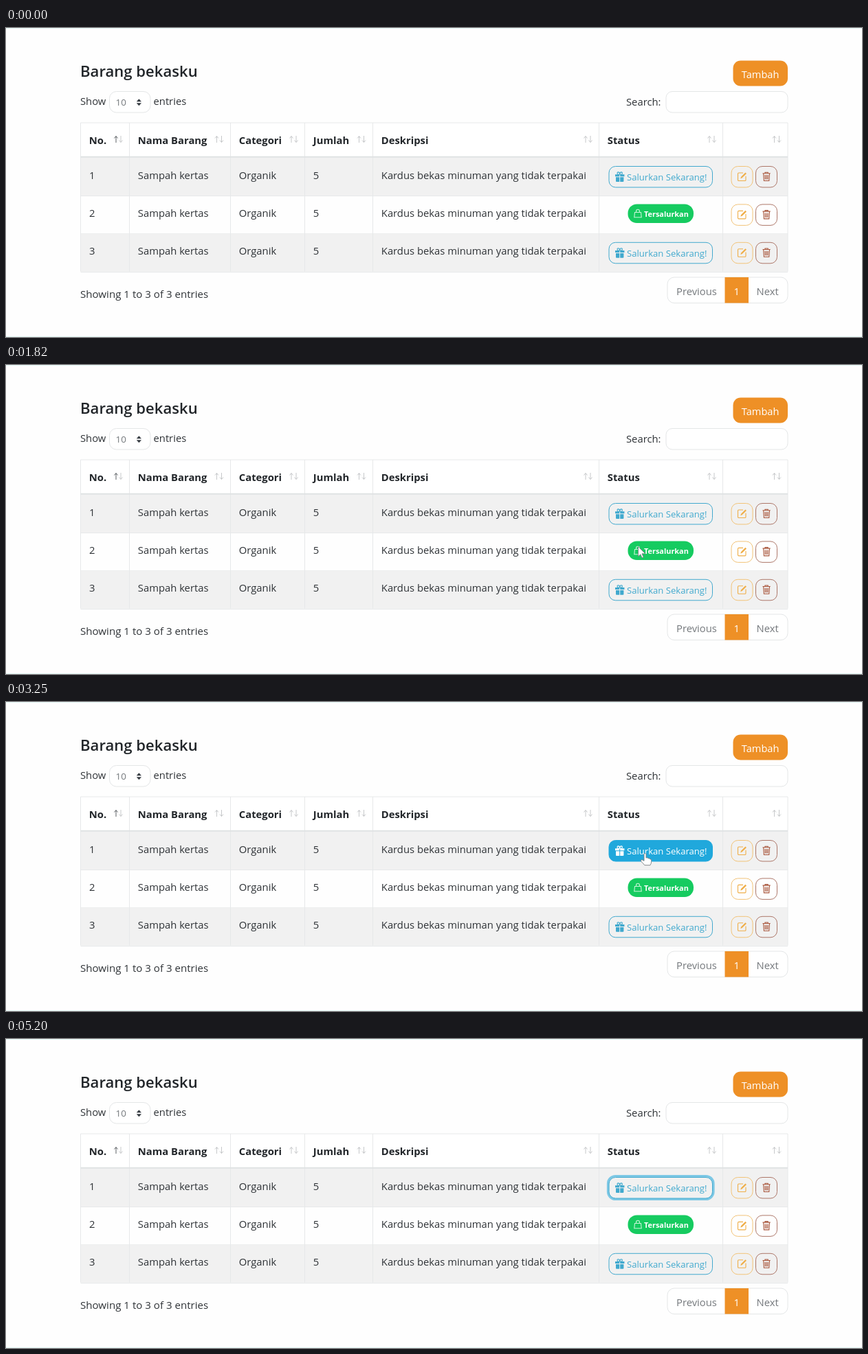
Animation, 1245 px wide and 450 px high, one loop 5.33 s. Source, as an HTML page:

```html
<!DOCTYPE html>
<html lang="id">
<head>
<meta charset="utf-8">
<title>Barang bekasku</title>
<style>
  html, body { margin: 0; width: 100%; height: 100%; overflow: hidden; background: #fefefe; }
  svg { display: block; width: 1245px; height: 450px; font: 14.8px "Open Sans", "Noto Sans", sans-serif; fill: #2f3337; }
  .line { fill: none; stroke: #e6e8e9; }
  .box { fill: #fff; stroke: #e4e6e7; }
  .bold { font-weight: 700; fill: #212529; }
  .muted { fill: #74787c; }
  .orange { fill: #ee9026; }
  .white { fill: #fff; }
  .sort { fill: none; stroke: #c6c8ca; }
  .icon { fill: none; stroke: currentColor; stroke-width: 1.1; }
</style>
</head>
<body>
<svg id="stage" viewBox="0 0 1245 450"></svg>
<script>
const STEP = 130, LOOP = 5330;
const BLUE = [32, 168, 220], OUTLINE = [65, 169, 206], WHITE = [255, 255, 255];
const columns = [108.5, 179.5, 326.5, 434.5, 533.5, 862.5, 1042.5, 1137];
const headers = ['No.', 'Nama Barang', 'Categori', 'Jumlah', 'Deskripsi', 'Status'];
const cells = ['Sampah kertas', 'Organik', '5', 'Kardus bekas minuman yang tidak terpakai'];
const sortX = [160, 306.5, 415, 513.5, 843, 1023, 1117.5];

const text = (x, y, label, attrs = '') => `<text x="${x}" y="${y}" ${attrs}>${label}</text>`;
const rect = (x, y, w, h, r, attrs) =>
  `<rect x="${x}" y="${y}" width="${w}" height="${h}" rx="${r}" ${attrs}/>`;
const path = (d, attrs) => `<path d="${d}" ${attrs}/>`;

const sortArrows = (x, i) =>
  path(`M${x} 167V157.5m-2.5 3 2.5-3 2.5 3`, `class="sort" ${i ? '' : 'style="stroke:#5c6064"'}`) +
  path(`M${x + 7} 157V166.5m-2.5-3 2.5 3 2.5-3`, 'class="sort"');

const giftIcon = `<g fill="currentColor">
  <path d="M886 213.2h6.2v3h-6.2zM893.2 213.2h6.2v3h-6.2zM887 217.2h5.2v6.8h-4.2q-1 0-1-1zM893.2 217.2h5.2v5.8q0 1-1 1h-4.2z"/>
  <path class="icon" d="M892.7 213.2h-3.2q-1.2-3.3 1-3.3 2.2 0 2.2 3.3 0-3.3 2.2-3.3 2.2 0 1 3.3z"/></g>`;

const sendButton = (id, dy) => `<g id="${id}" transform="translate(0 ${dy})">
  ${rect(875.5, 199.5, 153.5, 34, 11, 'class="ring" fill="none" stroke="#20a8dc" stroke-opacity=".55" stroke-width="3.2" opacity="0"')}
  ${rect(877, 201.5, 150.5, 30.5, 9.5, 'class="face" fill="#20a8dc" fill-opacity="0" stroke="#41a9ce"')}
  ${giftIcon}${text(903, 222, 'Salurkan Sekarang!', 'font-size="13.1" fill="currentColor"')}</g>`;

const badge = rect(904.5, 256.5, 95.5, 27.5, 13, 'fill="#16cb60"') +
  path('M914.5 268.5h9l.7 7.2h-10.4zM916.6 268.5v-2q0-2.3 2.4-2.3t2.4 2.3v2', 'class="icon" style="color:#c8f5d8"') +
  text(928, 274.7, 'Tersalurkan', 'class="white" font-size="10.9" font-weight="700"');

const rowTools = dy => `<g transform="translate(0 ${dy})">
  <g color="#efae48">${rect(1055, 201.5, 31, 30.5, 9.5, 'fill="none" stroke="#f2c377"')}
  ${path('M1072 211h-6.2q-1.3 0-1.3 1.3v8.9q0 1.3 1.3 1.3h8.9q1.3 0 1.3-1.3v-5.5', 'class="icon"')}
  ${path('M1068.3 219.2l.8-2.5 6.3-6.3 1.6 1.6-6.3 6.3z', 'fill="currentColor"')}</g>
  <g color="#a9573d">${rect(1090.5, 201.5, 31, 30.5, 9.5, 'fill="none" stroke="#ad7769"')}
  ${path('M1100.5 211.7h11.2M1104 211.5v-1.3h4.2v1.3M1101.7 212l.7 10.5h7.4l.7-10.5M1104 214l.3 6.5M1106.1 214v6.5M1108.2 214l-.3 6.5', 'class="icon"')}</g></g>`;

const tableRow = i => {
  const dy = i * 55.4, y = 219.5 + dy;
  return (i % 2 ? '' : rect(108.5, 188.5 + dy, 1028.5, 55.4, 0, 'fill="#f1f1f1"')) +
    path(`M108.5 ${244 + Math.round(dy)}.5H1137`, 'class="line"') +
    text(121, y, i + 1) +
    cells.map((label, c) => text(columns[c + 1] + 12.3, y, label)).join('') +
    (i === 1 ? badge : sendButton('send' + i, dy)) + rowTools(dy);
};

stage.innerHTML =
  path('M0 .5H1245M0 449.5H1245', 'stroke="#e4f8f5"') +
  text(108, 71, 'Barang bekasku', 'font-size="22.1" font-weight="600" fill="#212529"') +
  rect(1057.5, 47.5, 79.5, 37, 11, 'class="orange"') + text(1069.8, 73, 'Tambah', 'class="white" font-size="14.6"') +
  text(108, 112, 'Show') + rect(150.5, 92.5, 59.5, 30.5, 10, 'class="box"') +
  text(159.5, 113, '10', 'class="muted" font-size="13.4"') +
  path('M189.8 107.3h7.2l-3.6-4zM189.8 109.3h7.2l-3.6 4z', 'fill="#343a40"') +
  text(214.5, 112, 'entries') + text(902, 113, 'Search:') +
  rect(960, 92.5, 177, 30.5, 9, 'class="box"') +
  rect(108.5, 138, 1028.5, 50, 0, 'class="white"') +
  [0, 1, 2].map(tableRow).join('') +
  path('M108.5 138H1137' + columns.map(x => `M${x} 138V354.5`).join(''), 'class="line"') +
  path('M108.5 187.7H1137', 'stroke="#dfe2e3" stroke-width="2"') +
  headers.map((label, i) => text(columns[i] + 12.3, 169.2, label, 'class="bold"')).join('') +
  sortX.map(sortArrows).join('') +
  text(108, 392.5, 'Showing 1 to 3 of 3 entries', 'font-size="15.1"') +
  rect(962, 363, 175, 37.5, 10, 'class="box"') + rect(1045.5, 363, 34.5, 37.5, 0, 'class="orange"') +
  text(975, 388.5, 'Previous', 'class="muted"') + text(1058.6, 388.5, '1', 'class="white"') +
  text(1091.5, 388.5, 'Next', 'class="muted"') +
  `<g id="cursor" fill="#fff" stroke="#7a7e82" stroke-width=".9" stroke-linejoin="round">
    <path id="arrow" d="M.5.5V14.8l3.3-3.1 2.3 5 2.1-.9-2.2-5h4.8z"/>
    <path id="hand" d="M-2 11V2Q-2 .5-.5.5T1 2V7q2.4-1 3 .8 2-.6 2.4.9 2.2-.3 2.2 1.7v2.3q0 2.5-1.7 5H-1.2q-2-3-5-5.4-1.4-1.6.1-2.4 1.7-.7 4.1 1.5z"/>
  </g>`;

// Keys are [time, ...values].
const pointer = [[650, 835, 150], [1040, 895, 208], [1300, 945, 219], [1560, 945, 222], [1820, 919, 264],
  [2080, 945, 322], [2470, 940, 325], [2600, 932, 314], [2730, 924, 280], [2990, 930, 220], [3640, 930, 220],
  [3900, 871, 271], [4420, 240, 380], [4550, 97, 429], [4940, 97, 429]];
const hover = {
  send0: [[910, 0], [1040, .26], [1170, 1], [1560, 1], [1690, 0], [2860, 0], [2990, 1], [3900, 1], [4030, 0]],
  send2: [[1950, 0], [2080, 1], [2600, 1], [2730, .64], [2860, 0]]
};
const focus = [[3250, 0], [3380, 1]];
const handTimes = [[1040, 1560], [2080, 2730], [2990, 3640]];

function sample(keys, t) {
  const i = keys.findIndex(k => k[0] > t);
  if (i < 1) return keys[i ? keys.length - 1 : 0].slice(1);
  const [a, b] = [keys[i - 1], keys[i]], p = (t - a[0]) / (b[0] - a[0]);
  return a.slice(1).map((v, j) => v + (b[j + 1] - v) * p);
}
const mix = (a, b, p) => `rgb(${a.map((v, i) => Math.round(v + (b[i] - v) * p))})`;

function draw(now) {
  const t = Math.floor(now % LOOP / STEP) * STEP;
  for (const id in hover) {
    const button = document.getElementById(id), [level] = sample(hover[id], t);
    button.style.color = mix(OUTLINE, WHITE, level);
    const face = button.querySelector('.face');
    face.setAttribute('fill-opacity', level);
    face.setAttribute('stroke', mix(OUTLINE, BLUE, level));
  }
  send0.querySelector('.ring').setAttribute('opacity', sample(focus, t)[0]);
  const [x, y] = sample(pointer, t), isHand = handTimes.some(([a, b]) => t >= a && t <= b);
  cursor.setAttribute('transform', `translate(${x} ${y})`);
  cursor.style.display = t >= 650 && t < 4940 ? '' : 'none';
  hand.style.display = isHand ? '' : 'none';
  arrow.style.display = isHand ? 'none' : '';
  requestAnimationFrame(draw);
}
draw(performance.now());
</script>
</body>
</html>
```
